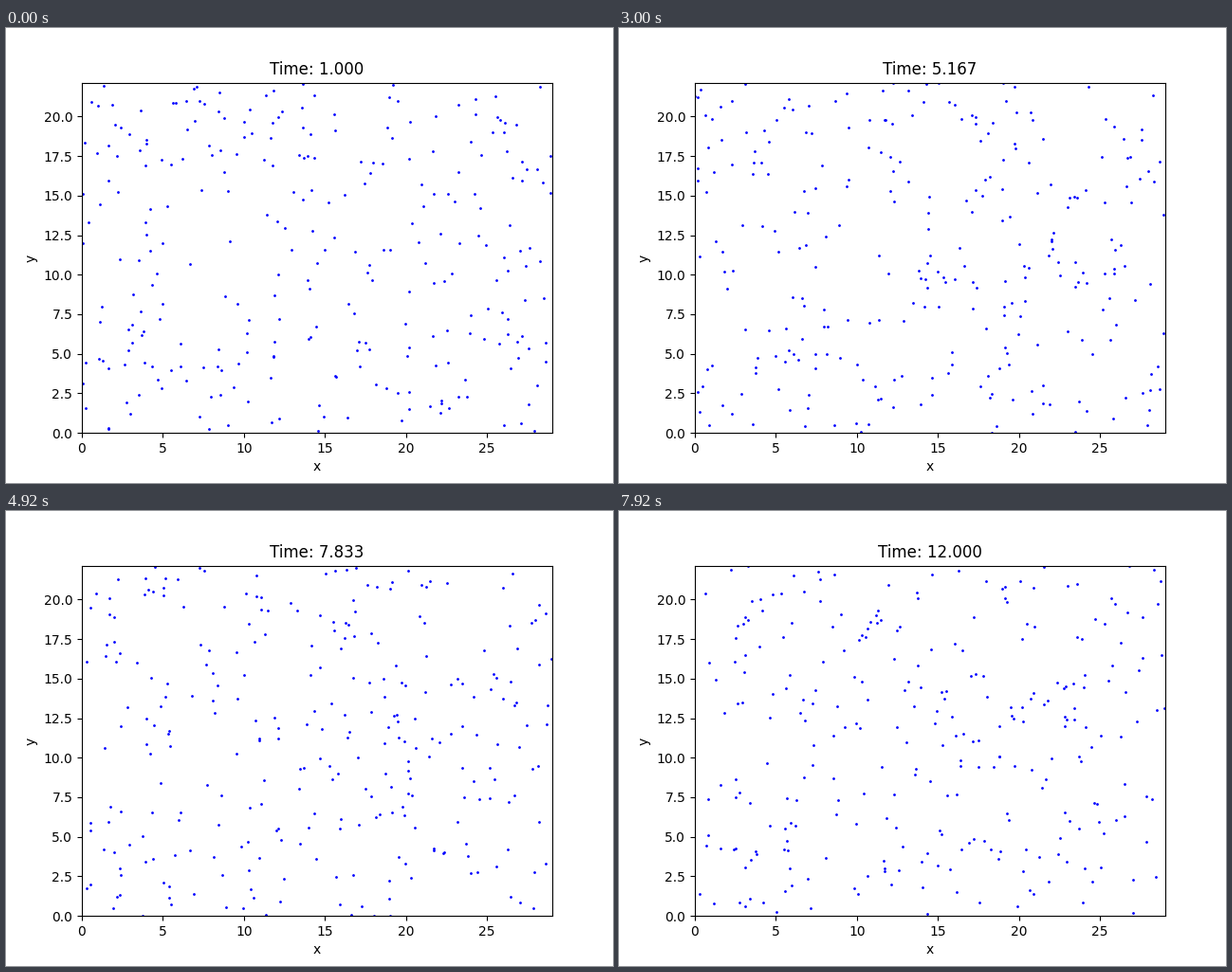
A matplotlib script that plays this animation: 640x480 px, repeating every 8000 ms.

```python
import numpy as np
import matplotlib.pyplot as plt
from matplotlib.animation import FuncAnimation

WIDTH, HEIGHT = 29.04, 22.14
COUNT = 280
START, STEP = 1.0, 1 / 6
TICK = 40      # ms per drawn frame
HOLD = 3       # drawn frames per simulation step
FRAMES = 200

rng = np.random.default_rng(12)
box = np.array([WIDTH, HEIGHT])
origin = rng.uniform(0, 1, (COUNT, 2)) * box
velocity = rng.normal(0, 1, (COUNT, 2))


def positions(elapsed):
    """Free flight, folded back at the walls."""
    path = (origin + velocity * elapsed) % (2 * box)
    return box - np.abs(path - box)


fig, ax = plt.subplots(figsize=(6.4, 4.8), dpi=100)
ax.set_xlim(0, WIDTH)
ax.set_ylim(0, HEIGHT)
ax.set_xticks(np.arange(0, 26, 5))
ax.set_yticks(np.arange(0, 21, 2.5))
ax.set_xlabel("x")
ax.set_ylabel("y")
title = ax.set_title("")
dots, = ax.plot([], [], "b.", markersize=2)


def update(i):
    elapsed = (i // HOLD) * STEP
    dots.set_data(*positions(elapsed).T)
    title.set_text(f"Time: {START + elapsed:.3f}")
    return dots, title


anim = FuncAnimation(fig, update, frames=FRAMES, init_func=lambda: update(0),
                     interval=TICK, repeat=True, repeat_delay=0)
plt.show()
```
